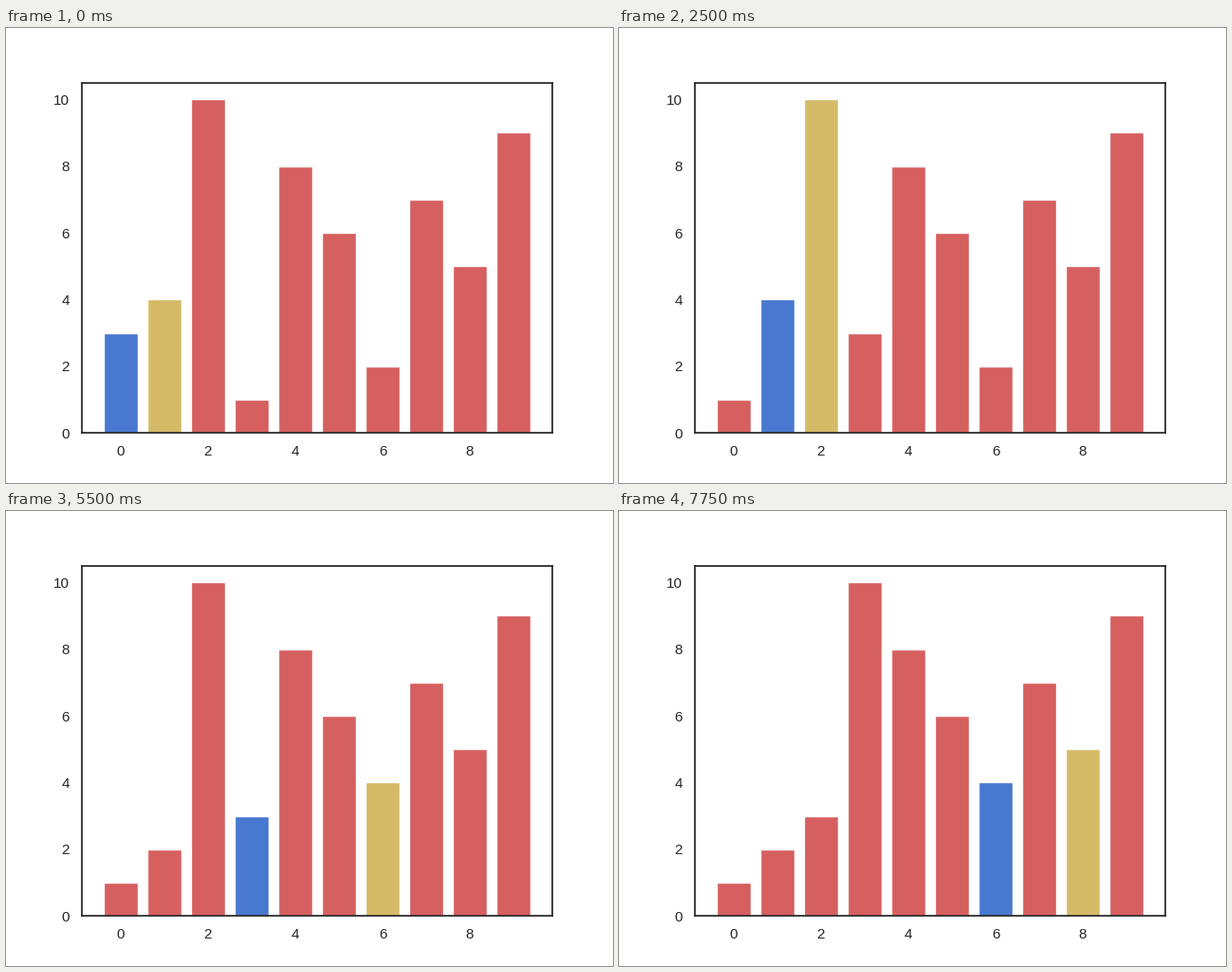
These frames come from a looping animation (640x480 px, 8 s). A matplotlib script:

```python
import itertools

import matplotlib.pyplot as plt
from matplotlib.animation import FuncAnimation

BLUE, YELLOW, RED, INK = "#4878D0", "#D5BB67", "#D65F5F", "0.15"
FRAMES, INTERVAL = 32, 250
VALUES = [3, 4, 10, 1, 8, 6, 2, 7, 5, 9]

plt.rcParams.update({
    "font.family": "Liberation Sans",
    "font.size": 11,
    "axes.linewidth": 1.25,
    "axes.edgecolor": INK,
    "axes.axisbelow": True,
    "xtick.color": INK,
    "ytick.color": INK,
    "xtick.labelsize": 11,
    "ytick.labelsize": 11,
    "xtick.major.size": 6,
    "ytick.major.size": 6,
    "xtick.bottom": False,
    "ytick.left": False,
})


def selection_sort(values):
    """Yield (heights, blue index, yellow index) per comparison and swap."""
    a = list(values)
    for i in range(len(a) - 1):
        low = i
        for j in range(i + 1, len(a)):
            yield a[:], low, j
            if a[j] < a[low]:
                low = j
        a[i], a[low] = a[low], a[i]
        yield a[:], i, low


steps = list(itertools.islice(selection_sort(VALUES), FRAMES))

fig, ax = plt.subplots(figsize=(6.4, 4.8), dpi=100)
bars = ax.bar(range(len(VALUES)), VALUES, color=RED, edgecolor="white", linewidth=1)
ax.set_xlim(-0.89, 9.89)
ax.set_ylim(0, 10.5)
ax.set_xticks(range(0, 10, 2))
ax.set_yticks(range(0, 11, 2))


def draw(frame):
    heights, blue, yellow = steps[frame]
    for k, (bar, height) in enumerate(zip(bars, heights)):
        bar.set_height(height)
        bar.set_facecolor(BLUE if k == blue else YELLOW if k == yellow else RED)
    return list(bars)


anim = FuncAnimation(fig, draw, frames=FRAMES, interval=INTERVAL,
                     init_func=lambda: draw(0), repeat=True, repeat_delay=0)
plt.show()
```
